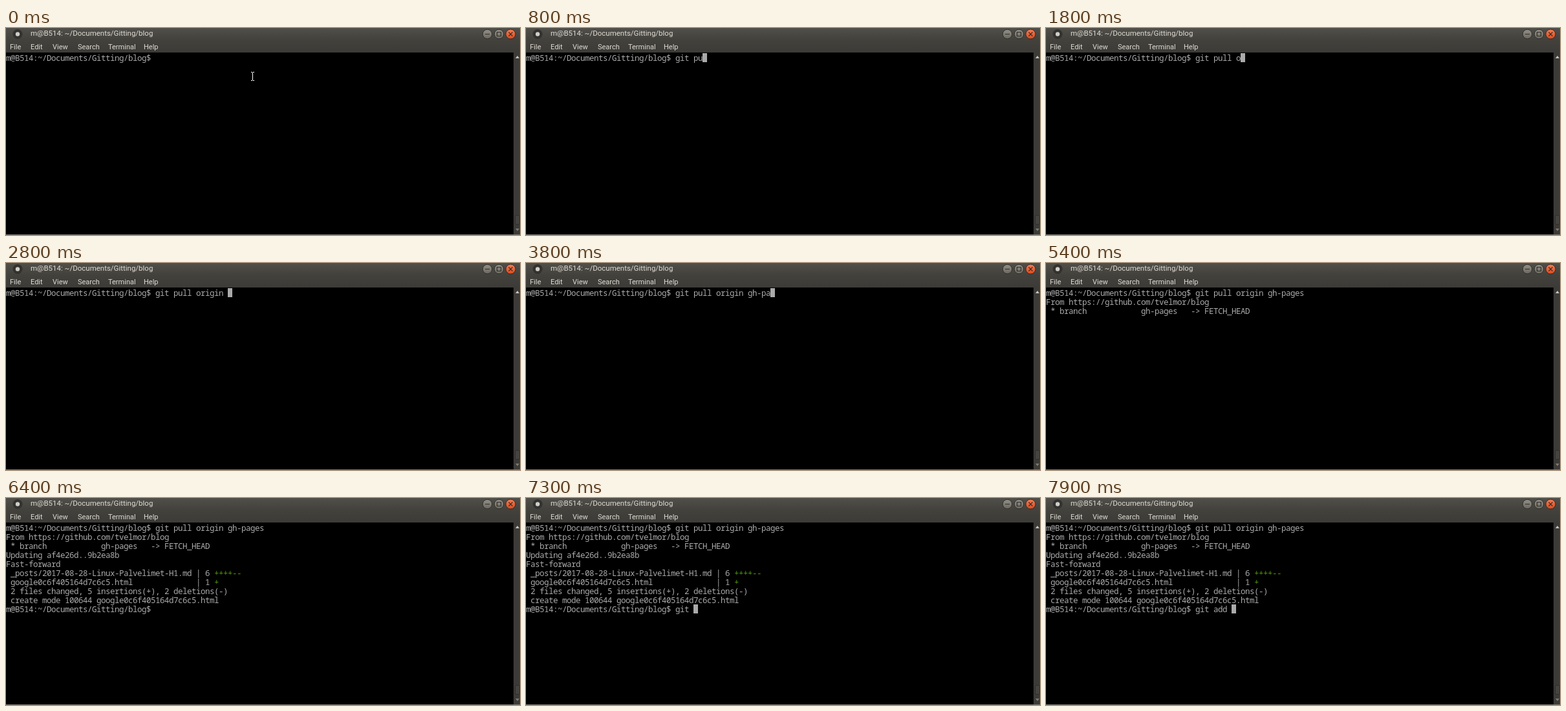
These frames come from a looping animation (795x321 px, 8000 ms). An HTML page:

```html
<!DOCTYPE html>
<html lang="en">
<head>
<meta charset="utf-8">
<title>Terminal</title>
<style>
html, body { margin: 0; width: 100%; height: 100%; overflow: hidden; background: #000; }
svg { display: block; width: 795px; height: 321px; }
text { white-space: pre; }
.ui { font: 11px Roboto, "Open Sans", sans-serif; fill: #dfdbd2; }
.title { font-size: 11.5px; }
.term { font: 12.5px "Noto Sans Mono", "DejaVu Sans Mono", monospace; fill: #aaa; }
.add { fill: #4e9a06; }
</style>
</head>
<body>
<svg viewBox="0 0 795 321">
  <defs>
    <linearGradient id="bar" x2="0" y2="1">
      <stop offset="0" stop-color="#504f4a"/>
      <stop offset=".5" stop-color="#42413c"/>
      <stop offset="1" stop-color="#3c3b37"/>
    </linearGradient>
    <linearGradient id="grey" x2="0" y2="1">
      <stop offset="0" stop-color="#928f86"/>
      <stop offset="1" stop-color="#6b6860"/>
    </linearGradient>
    <linearGradient id="orange" x2="0" y2="1">
      <stop offset="0" stop-color="#f47c54"/>
      <stop offset="1" stop-color="#df4a1c"/>
    </linearGradient>
  </defs>

  <rect width="795" height="321"/>
  <rect width="795" height="38" fill="url(#bar)"/>
  <circle cx="18" cy="9.5" r="7.5" fill="#33322f"/>
  <circle cx="18" cy="9.5" r="3.2" fill="#d0cec8"/>

  <g stroke="#2f2e2a">
    <circle cx="744.5" cy="9.5" r="7.2" fill="url(#grey)"/>
    <circle cx="762.5" cy="9.5" r="7.2" fill="url(#grey)"/>
    <circle cx="780.5" cy="9.5" r="7.5" fill="url(#orange)"/>
    <path d="M741 9.5h7M759.5 6.5h6v6h-6zM777.5 6.5l6 6m0-6l-6 6" fill="none" stroke-width="1.2"/>
  </g>

  <g class="ui">
    <text class="title" x="38" y="12">m@B514: ~/Documents/Gitting/blog</text>
    <text x="6" y="33">File</text>
    <text x="38" y="33">Edit</text>
    <text x="72" y="33">View</text>
    <text x="111" y="33">Search</text>
    <text x="158" y="33">Terminal</text>
    <text x="213" y="33">Help</text>
  </g>

  <rect x="785" y="38" width="10" height="283" fill="#3c3b37"/>
  <path d="M788 47l3-4 3 4z" fill="#c9c6be"/>
  <path d="M788 311l3 4 3-4z" fill="#7d7a72"/>
  <rect x="787.5" y="290.5" width="7" height="14" rx="2" fill="#454440" stroke="#2e2d2a"/>
  <rect y="320" width="795" height="1" fill="#777570"/>

  <g id="term" class="term"></g>
  <rect id="cursor" width="7" height="14" fill="#aaa"/>
  <path id="pointer" d="M379 68.5h2m1 0h2M381.5 69v12M379 81.5h2m1 0h2" fill="none" stroke="#fff"/>
</svg>
<script>
const LOOP = 8000, CELL = 7, ROW = 14, TOP = 39;
const NS = "http://www.w3.org/2000/svg";
const $ = id => document.getElementById(id);
const prompt = "m@B514:~/Documents/Gitting/blog$ ";
const page = "google0c6f405164d7c6c5.html";

const pull = {
  text: "git pull origin gh-pages",
  keys: [200, 400, 500, 600, 700, 800, 1100, 1200, 1400, 1800, 2000, 2200,
         2300, 2400, 2600, 2800, 3100, 3200, 3600, 3800, 3800, 4000, 4100, 4300]
};
const add = {
  text: "git add ",
  keys: [7000, 7100, 7200, 7300, 7400, 7600, 7800, 7900]
};
const ENTER = 4600, FETCHED = 5400, DONE = 5500;
const cursorOn = [[200, 5200], [5800, 6400], [7000, LOOP]];

// Each row: time it appears, plain text, green tail
const rows = [
  [0, prompt],
  [FETCHED, "From https://github.com/tvelmor/blog"],
  [FETCHED, " * branch            gh-pages   -> FETCH_HEAD"],
  [DONE, "Updating af4e26d..9b2ea8b"],
  [DONE, "Fast-forward"],
  [DONE, " _posts/2017-08-28-Linux-Palvelimet-H1.md | 6 ", "++++--"],
  [DONE, (" " + page).padEnd(42) + "| 1 ", "+"],
  [DONE, " 2 files changed, 5 insertions(+), 2 deletions(-)"],
  [DONE, " create mode 100644 " + page],
  [DONE, prompt]
];

const solid = s => s.replace(/ /g, "\u00a0");

function make(tag, parent, text = "") {
  const el = document.createElementNS(NS, tag);
  el.textContent = solid(text);
  return parent.appendChild(el);
}

const lines = rows.map(([, text, tail], i) => {
  const el = make("text", $("term"), text);
  el.setAttribute("y", TOP + i * ROW + 12);
  if (tail) make("tspan", el, tail).setAttribute("class", "add");
  return el;
});

// Fit the font's advance to the terminal grid
function setGrid() {
  const probe = make("text", $("term"), "0".repeat(50));
  probe.style.letterSpacing = "0px";
  const advance = probe.getComputedTextLength() / 50;
  probe.remove();
  $("term").style.letterSpacing = CELL - advance + "px";
}

const count = (cmd, t) => cmd.keys.filter(k => k <= t).length;
const show = (el, on) => el.setAttribute("visibility", on ? "visible" : "hidden");

function setText(el, text) {
  text = solid(text);
  if (el.textContent !== text) el.textContent = text;
}

function draw(t) {
  const a = count(pull, t), b = count(add, t);
  setText(lines[0], prompt + pull.text.slice(0, a));
  setText(lines[9], prompt + add.text.slice(0, b));
  lines.forEach((el, i) => show(el, t >= rows[i][0]));

  const [row, col] = t < ENTER ? [0, prompt.length + a]
    : t < FETCHED ? [1, 0]
    : [9, prompt.length + b];
  $("cursor").setAttribute("x", col * CELL);
  $("cursor").setAttribute("y", TOP + row * ROW);
  show($("cursor"), cursorOn.some(([from, to]) => t >= from && t < to));
  show($("pointer"), t < 200);
}

setGrid();
const start = performance.now();
function tick() {
  draw((performance.now() - start) % LOOP);
  requestAnimationFrame(tick);
}
tick();
</script>
</body>
</html>
```
